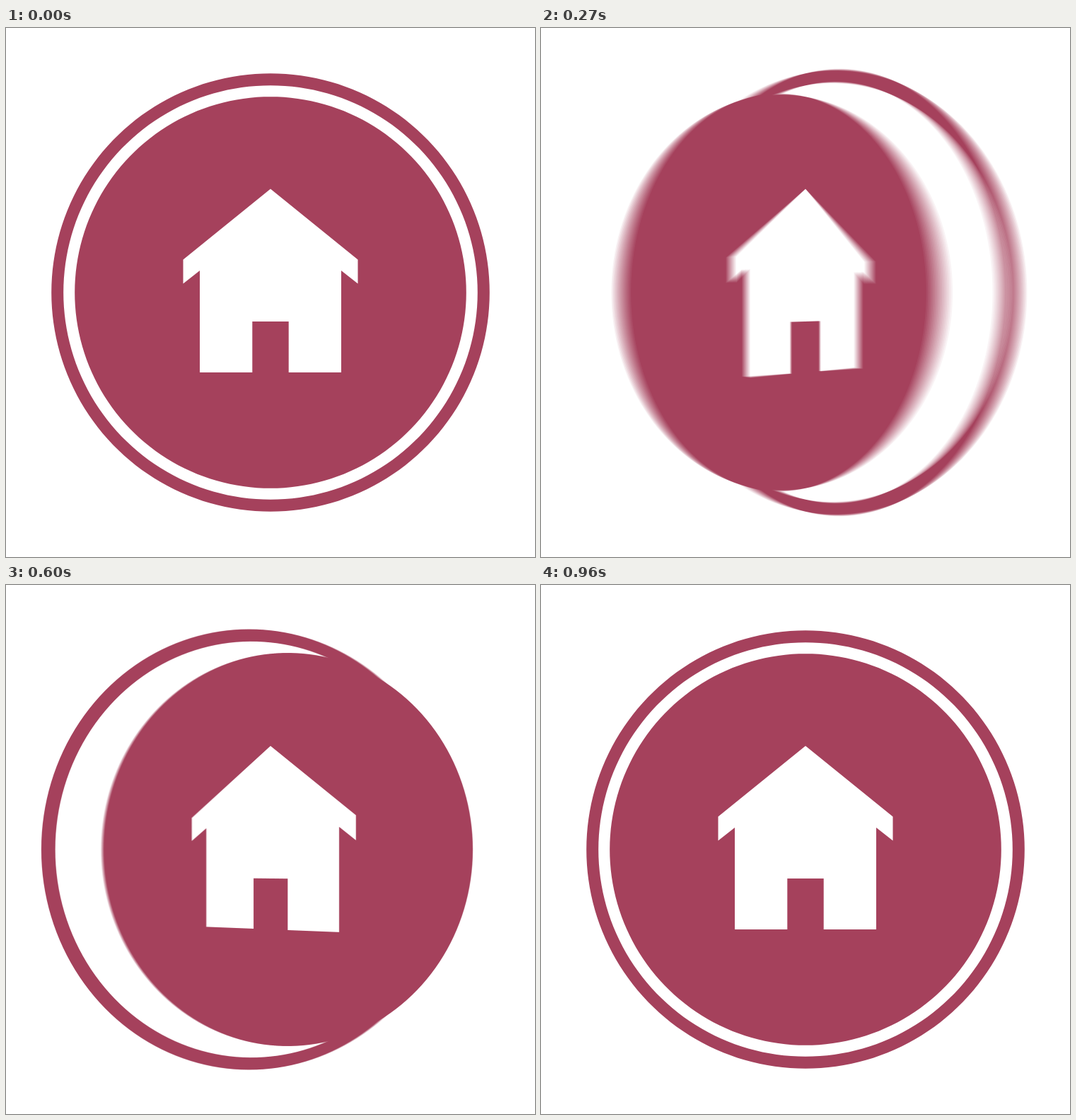
Recreate the animation shown at these times as an HTML page with a canvas. Size 748 px wide and 748 px high, loop 7.2 s.

```html
<!DOCTYPE html>
<html lang="en">
<head>
<meta charset="utf-8">
<title>Spinning house badge</title>
<style>
  html, body { margin: 0; width: 100%; height: 100%; overflow: hidden; background: #fff; }
  canvas { display: block; width: 748px; height: 748px; }
</style>
</head>
<body>
<canvas id="stage" width="748" height="748"></canvas>
<script>
const SIZE = 748, MID = SIZE / 2;
const CAMERA = SIZE * 50 / 36;          // 50 mm lens on 36 mm film
const COLOR = '#a5415c';
const STEP = 30, LOOP = 7200;           // ms per picture, ms per loop
const SPIN = 31, REST = 32;             // pictures
const SAMPLES = 16, SHUTTER = 0.5;      // motion blur

const ctx = document.getElementById('stage').getContext('2d');

const circle = (r, dir) => Array.from({ length: 180 }, (_, i) => {
  const a = dir * i * Math.PI / 90;
  return [r * Math.cos(a), r * Math.sin(a)];
});

const left = [[-123.5, -46.5], [-123.5, -12.5], [-100, -31], [-100, 113], [-25.7, 113], [-25.7, 41]];
const right = left.map(([x, y]) => [-x, y]).reverse();
const house = [[0, -146.5], ...left, ...right];

// Opposite winding cuts holes under the nonzero rule.
const disc = [circle(276.8, 1), house];
const ring = [circle(309.8, 1), circle(292.8, -1)];

function addTurned(shapes, angle) {
  const c = Math.cos(angle), s = Math.sin(angle);
  for (const shape of shapes) {
    shape.forEach(([x, y], i) => {
      const k = CAMERA / (CAMERA - x * s);
      const px = MID + x * c * k, py = MID + y * k;
      if (i) ctx.lineTo(px, py); else ctx.moveTo(px, py);
    });
    ctx.closePath();
  }
}

// cubic-bezier(1/3, 0, 0, 1)
function ease(x) {
  if (x <= 0) return 0;
  if (x >= 1) return 1;
  let lo = 0, hi = 1;
  for (let i = 0; i < 30; i++) {
    const u = (lo + hi) / 2;
    if (u * (1 - 2 * u + 2 * u * u) < x) lo = u; else hi = u;
  }
  return lo * lo * (3 - 2 * lo);
}

function badge(pos, alpha) {
  const angle = 2 * Math.PI * (1 - ease(pos / SPIN));
  ctx.globalAlpha = alpha;
  ctx.beginPath();
  addTurned(disc, angle);
  addTurned(ring, -angle);
  ctx.fill();
}

function draw(n) {
  ctx.globalCompositeOperation = 'source-over';
  ctx.clearRect(0, 0, SIZE, SIZE);
  ctx.fillStyle = COLOR;
  if (n === 0 || n >= REST) {
    badge(n, 1);
  } else {
    // Sum the coverage, then tint it.
    ctx.globalCompositeOperation = 'lighter';
    ctx.fillStyle = '#000';
    for (let k = 0; k < SAMPLES; k++) {
      badge(n + ((k + 0.5) / SAMPLES - 0.5) * SHUTTER, 16 / 255);
    }
    ctx.globalAlpha = 1;
    ctx.globalCompositeOperation = 'source-in';
    ctx.fillStyle = COLOR;
    ctx.fillRect(0, 0, SIZE, SIZE);
  }
  ctx.globalAlpha = 1;
  ctx.globalCompositeOperation = 'destination-over';
  ctx.fillStyle = '#fff';
  ctx.fillRect(0, 0, SIZE, SIZE);
}

const start = performance.now();
let shown = -1;
function tick() {
  const t = (performance.now() - start) % LOOP;
  const n = Math.min(REST, Math.floor(t / STEP));
  if (n !== shown) draw(shown = n);
  requestAnimationFrame(tick);
}
tick();
</script>
</body>
</html>
```
